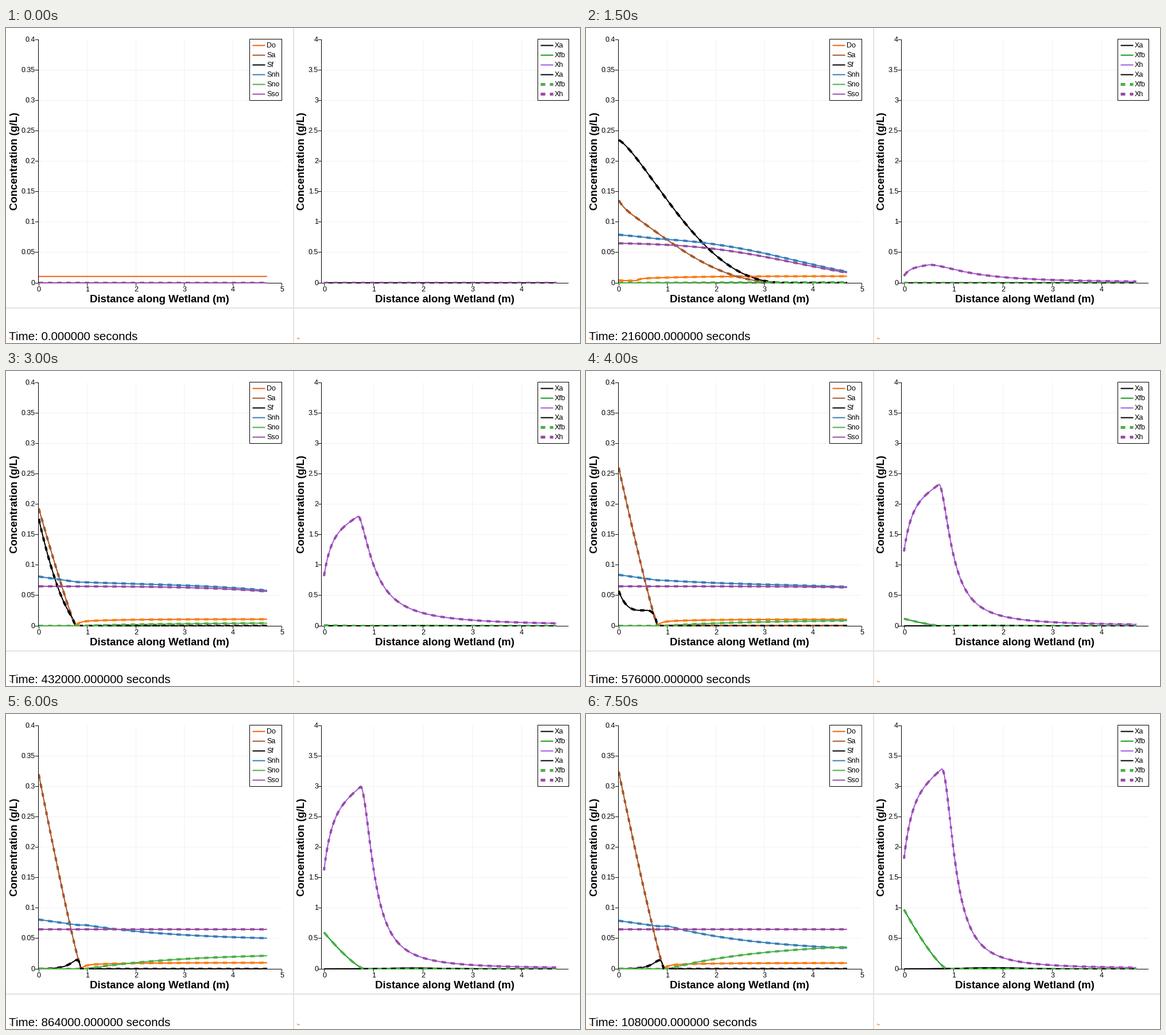
A matplotlib script that plays this animation: 1000x550 px, repeating every 8000 ms.

```python
import math

import matplotlib.pyplot as plt
import numpy as np
from matplotlib.animation import FuncAnimation
from matplotlib.patches import Rectangle

W, H, DPI = 1000, 550, 100
FRAMES, INTERVAL = 16, 500
STEP, UNIT = 72000, 144000     # simulated seconds per frame and per time unit u
PX = 72 / DPI                  # points per pixel
X = np.linspace(0, 4.7, 1600)  # distance along the wetland


def edge(u):
    """Distance at which the substrates run out."""
    return np.interp(u, [1, 2, 7.5], [0, .72, .925])


def front(u):
    """Advected and dispersed inflow, 1 at the inlet."""
    if u == 0:
        return 0 * X
    spread = 1.32 * math.sqrt(2 * u)
    f = np.array([math.erfc((x - 2.42 * u) / spread) for x in X])
    return f / f[0]


def plume(u, q_late):
    """Bell-shaped while the front passes, nearly a straight ramp afterwards."""
    t = [.5, 1, 1.5, 2]
    k = np.interp(u, t, [5.1, 8.5, 3.5, .72]) if u < 2 else edge(u)
    p = np.interp(u, t, [2, 2, 1.3, 1])
    q = np.interp(u, t, [10, 10, 2.5, 1.2]) if u < 2 else q_late
    return np.maximum(1 - (X / k) ** p, 0) ** q


def fermentable(u):
    amp = np.interp(u, [0, .5, 1, 2, 3, 4, 5], [0, .225, .226, .243, .165, .036, 0])
    main = amp * plume(u, np.interp(u, [2, 3, 4], [1.2, 1.6, 5]))
    if u <= 2:
        return main
    k = edge(u)
    rest = np.interp(u, [2, 4, 5], [0, .028, .035])
    width = np.interp(u, [4, 5, 6], [3, .2, .16])
    cut = np.maximum(1 - (X / k) ** 12, 0)
    return main + rest * cut * np.exp(np.minimum(X - k, 0) / width)


def acetate(u):
    amp = np.interp(u, [0, .5, 2, 4, 5, 7.5], [0, .113, .126, .26, .317, .324])
    inlet = np.interp(u, [0, .5, 1, 2], [0, .028, .028, 0])
    return amp * plume(u, 1.1) + inlet * np.exp(-X / .12)


def oxygen(u):
    start = min(u, 1)
    early = .0106 + start * (.0015 * np.exp(-X / .08) - .0036 * np.exp(-(X / 1.7) ** 2))
    s = np.maximum(X - edge(u), 0)
    level = np.interp(u, [2, 7.5], [.0112, .0096])
    late = level * (1 - .65 * np.exp(-s / .08) - .35 * np.exp(-s / .8))
    mix = np.clip(u - 1, 0, 1)
    return (1 - mix) * early + mix * late


def nitrate(u):
    rise = 1 - np.exp(-np.maximum(X - edge(u) - .1, 0) / 2)
    return .036 * (u / 7.5) ** 2.3 * rise / rise[-1]


def ammonium(u):
    inlet = .079 + .0055 * math.exp(-((u - 4.5) / 1.5) ** 2)
    uptake = .009 * np.clip(u - 1, 0, 1) * np.minimum(X / .8, 1)
    return np.maximum((inlet - uptake) * front(u) - nitrate(u), 0)


def heterotrophs(u):
    # exponential growth, then saturation as the substrate limits it
    peak = min(.09 * 11 ** (u - 1), 3.8 - 1.47 * math.exp(-.304 * (u - 4)))
    at = np.interp(u, [1, 2, 7.5], [.35, .68, .765])
    r = np.interp(u, [2, 4, 7.5], [.38, .525, .55])
    s = np.minimum(X / at, 1)
    rise = r + (1 - r) * (.35 * s + .65 * (1 - np.exp(-s / .2)))
    half = np.interp(u, [1, 2, 4], [1.45, .42, .29])
    n = np.interp(u, [1, 2, 4, 7.5], [2, 1.35, 1.75, 1.95])
    fall = 1 / (1 + (np.maximum(X - at, 0) / half) ** n)
    return (peak if u else 0) * rise * fall


def fermenters(u):
    amp = .075 * math.log1p(math.exp((u - 3.6) / .3))
    k = max(edge(u) - .06, .5)
    return amp * np.maximum(1 - X / k, 0) ** 1.3


def autotrophs(u):
    return .0035 * max(u - 2, 0) * np.exp(-((X - 1.8) / .8) ** 2)


def solutes(u):
    return [oxygen(u), acetate(u), fermentable(u), ammonium(u), nitrate(u),
            .065 * front(u)]


def biomass(u):
    return [autotrophs(u), fermenters(u), heterotrophs(u)]


fig = plt.figure(figsize=(W / DPI, H / DPI), dpi=DPI, facecolor="white")
ax = fig.add_axes([0, 0, 1, 1])
ax.set_xlim(0, W)
ax.set_ylim(H, 0)
ax.axis("off")


def stroke(xs, ys, color="black", width=1, z=1):
    return ax.plot(xs, ys, color=color, lw=width * PX, zorder=z, snap=False,
                   solid_capstyle="butt")[0]


def label(x, y, text, size, **kw):
    return ax.text(x, y, text, fontsize=size * PX, family="Liberation Sans",
                   color="black", zorder=8, **kw)


class Chart:
    BASE = 445

    def __init__(self, axis_x, x0, sx, right, sy, xticks, yticks, solid, dashed):
        self.x0, self.sx, self.sy = x0, sx, sy
        base = self.BASE + .5
        for i, v in enumerate(xticks):
            x = math.floor(x0 + v * sx) + .5
            if i and x < right - 5:
                stroke([x, x], [20, base], "#f1f1f1")
            stroke([x, x], [base, 450], z=3)
            label(x, 460.5, f"{v:g}", 12.5, ha="center")
        for i, v in enumerate(yticks):
            y = math.floor(self.BASE - v * sy) + .5
            if 0 < i < len(yticks) - 1:
                stroke([axis_x, right], [y, y], "#f1f1f1")
            stroke([axis_x - 5.5, axis_x], [y, y], z=3)
            label(axis_x - 5.5, y + 3.7, f"{v:g}", 12.5, ha="right")
        stroke([axis_x, axis_x], [20, base], z=3)
        stroke([axis_x, right], [base, base], z=3)
        clip = Rectangle((axis_x, 20), right - axis_x, 426, transform=ax.transData)
        self.solid = [stroke([], [], c, 2, 4) for c in solid]
        self.dashed = [stroke([], [], c, 4, 5) for c in dashed]
        for ln in self.solid + self.dashed:
            ln.set_clip_path(clip)

    def draw(self, solid, dashed):
        px = self.x0 + X * self.sx
        for ln, v in zip(self.solid, solid):
            ln.set_data(px, self.BASE - v * self.sy)
        for ln, v in zip(self.dashed, dashed):
            py = self.BASE - v * self.sy
            # dashes are counted in pixels along the steeper direction
            run = np.maximum(np.abs(np.diff(px)), np.abs(np.diff(py)))
            run = np.concatenate([[0], np.cumsum(run)])
            ln.set_data(px, np.where(run % 16 < 8, py, np.nan))


def legend(x, right, rows):
    ax.add_patch(Rectangle((x, 19.5), right - x, 107, fc="white", ec="black",
                           lw=PX, zorder=6, snap=False))
    for i, (name, color, dash) in enumerate(rows):
        y = 30.5 + 17 * i
        for a, b in [(5, 13), (21, 27)] if dash else [(5, 27)]:
            stroke([x + a, x + b], [y, y], color, 5 if dash else 2, 7)
        label(x + 29.5, y + 3.5, name, 12.5)


ORANGE, BROWN, BLUE = "#f2600c", "#a65628", "#377eb8"
GREEN, PURPLE = "#4daf4a", "#984ea3"
DEEP_GREEN, VIOLET = "#129a1c", "#a658e6"
SOLUTES = [ORANGE, BROWN, "black", BLUE, GREEN, PURPLE]

left = Chart(56.5, 57, 84.65, 480, 1062.5, range(6), np.arange(9) * .05,
             SOLUTES, ["#ff7f00"] + SOLUTES[1:])
right = Chart(549.5, 554, 86.1, 980, 106.25, range(5), np.arange(9) * .5,
              ["black", DEEP_GREEN, VIOLET, "black"], [GREEN, PURPLE])

names = ["Do", "Sa", "Sf", "Snh", "Sno", "Sso"]
legend(424.5, 480.5, [(name, c, False) for name, c in zip(names, SOLUTES)])
legend(926.5, 980.5, [("Xa", "black", False), ("Xfb", DEEP_GREEN, False),
                      ("Xh", VIOLET, False), ("Xa", "black", False),
                      ("Xfb", GREEN, True), ("Xh", PURPLE, True)])

for cx, bx in ((267.5, 20), (764.5, 520)):
    label(cx, 479, "Distance along Wetland (m)", 18.7, ha="center", weight="bold")
    label(bx, 232.5, "Concentration (g/L)", 18.7, ha="center", weight="bold",
          rotation=90, rotation_mode="anchor")

# Pane borders and the small corner marks
stroke([0, W], [489, 489], "#e2e2e0", 2)
stroke([501, 501], [0, H], "#e2e2e0", 2)
for x in (6.5, 507.5):
    stroke([x, x + .8, x + 4.5], [540.5, 542.5, 542.5], "#f08020", 1.2, 9)

clock = label(5, 545, "", 20.7)


def draw(n):
    u = n * STEP / UNIT
    s, b = solutes(u), biomass(u)
    left.draw(s, [s[0] if n else 0 * X] + s[1:])
    right.draw(b + [b[0]], b[1:])
    clock.set_text(f"Time: {n * STEP:.6f} seconds")
    return left.solid + left.dashed + right.solid + right.dashed + [clock]


anim = FuncAnimation(fig, draw, frames=FRAMES, interval=INTERVAL,
                     init_func=lambda: draw(0), repeat=True, repeat_delay=0)
plt.show()
```
